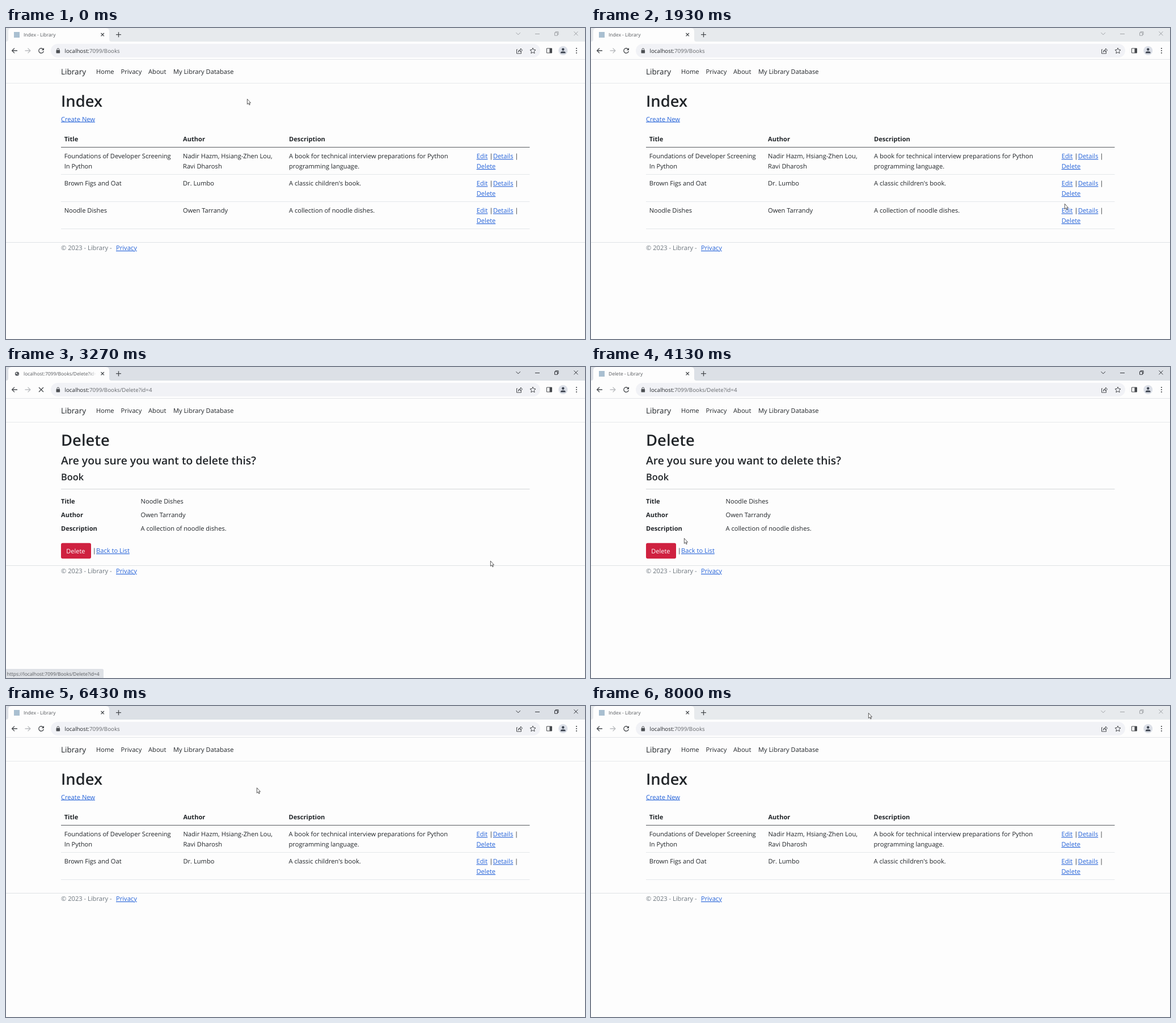
An HTML page for the animation above (8030 ms loop, 1021 by 549 pixels).

```html
<!DOCTYPE html>
<html lang="en">
<head>
<meta charset="utf-8">
<title>Library</title>
<style>
  html, body { margin: 0; width: 100%; height: 100%; overflow: hidden; background: #fdfdfd; }
  svg { display: block; width: 100vw; height: 100vh; }
  text { font-family: "Open Sans", "Noto Sans", sans-serif; font-size: 11.15px; fill: #212529;
         text-rendering: geometricPrecision; white-space: pre; }
  .link { fill: #2563d9; text-decoration: underline; text-decoration-thickness: 1px; }
  .bold { font-weight: 700; font-size: 11.1px; }
  .muted { fill: #6c757d; }
  .head { font-weight: 600; }
  .small { font-size: 8.5px; fill: #55585c; }
  .url { font-size: 9.75px; fill: #25282c; }
  .icon { fill: none; stroke: #46494d; stroke-width: 1.3; }
</style>
</head>
<body>
<svg viewBox="0 0 1021 549">
  <defs>
    <linearGradient id="fade">
      <stop offset="0" stop-color="#fdfdfd" stop-opacity="0"/>
      <stop offset="1" stop-color="#fdfdfd"/>
    </linearGradient>
  </defs>
  <rect width="1021" height="549" fill="#fdfdfd"/>

  <!-- Tab strip -->
  <rect id="strip" width="1021" height="24"/>
  <path d="M0 24Q4 24 4 20V6Q4 0 10 0H176Q182 0 182 6V20Q182 24 186 24Z" fill="#fdfdfd"/>
  <rect id="favicon" x="14" y="7" width="10" height="10" fill="#a9bfd0"/>
  <g id="globe">
    <circle cx="19.5" cy="12" r="3.6" fill="#505459"/>
    <path d="M17 11l2-1 1 1-2 2zM20 13l2-1-1 2z" fill="#fdfdfd"/>
  </g>
  <text id="tabTitle" class="small" x="31" y="14.5"></text>
  <rect x="146" y="4" width="13" height="16" fill="url(#fade)"/>
  <rect x="159" y="4" width="20" height="16" fill="#fdfdfd"/>
  <path class="icon" d="M167.5 9l5.4 5.4M172.9 9l-5.4 5.4M198.5 7.2v9M194 11.7h9"/>
  <g id="controls" fill="none">
    <path d="M899.5 8.2l3.7 3.7 3.7-3.7M933 10.5h8M1001.5 6.3l7 7M1008.5 6.3l-7 7"/>
    <path d="M967.5 8.2h5v5h-5zM969 8V6.7h5v5h-1.3"/>
  </g>

  <!-- Toolbar -->
  <rect x="79" y="28" width="863" height="24" rx="12" fill="#f1f2f6"/>
  <path d="M0 55.5H1021" stroke="#e3e5e8"/>
  <path class="icon" d="M20 40h-9M15 35.6L10.6 40l4.4 4.4"/>
  <path class="icon" style="stroke:#b9bbbe" d="M33.500 40h9M38.500 35.600l4.400 4.400-4.400 4.400"/>
  <g id="reload">
    <path class="icon" d="M65.700 37.700A4.300 4.300 0 1 0 66.300 41"/>
    <path d="M67 35v4.300h-4.300z" fill="#46494d"/>
  </g>
  <path id="stop" class="icon" d="M58 36l8 8M66 36l-8 8"/>
  <rect x="88.500" y="39" width="6.600" height="5.500" rx=".8" fill="#4d5054"/>
  <path class="icon" style="stroke-width:1" d="M90 39.500v-1.700a1.800 1.800 0 0 1 3.600 0v1.700"/>
  <text class="url" x="103.500" y="43.600">localhost:<tspan id="path"></tspan></text>
  <g class="icon" style="stroke-width:1">
    <path d="M902 38h-1.500v7h8v-2.500M903 42.500q.5-4 4.500-4.200V36l3 3.200-3 3.200v-2.200q-3-.2-4.500 2.300z"/>
    <path d="M929 35.200l1.500 3.200 3.500.4-2.600 2.400.7 3.500-3.100-1.800-3.100 1.800.7-3.500-2.600-2.400 3.500-.4z"/>
    <path d="M953.500 36h9v8h-9z"/>
  </g>
  <rect x="958.500" y="36" width="4.500" height="8" fill="#46494d"/>
  <circle cx="982.300" cy="40" r="8" fill="#dbdfe7"/>
  <path d="M978 44.500v-1q0-2.200 4.300-2.200t4.300 2.200v1z" fill="#3d4450"/>
  <circle cx="982.300" cy="37.800" r="2.200" fill="#3d4450"/>
  <g fill="#46494d"><circle cx="1006" cy="36" r="1.100"/><circle cx="1006" cy="40" r="1.100"/><circle cx="1006" cy="44" r="1.100"/></g>

  <g id="nav"></g>
  <g id="fullList"></g>
  <g id="deletePage"></g>
  <g id="shortList"></g>

  <g id="status">
    <path d="M0 533H169.500Q172 533 172 535.500V549H0Z" fill="#dee1e6"/>
    <text class="small" x="1.500" y="544.600">https://localhost:7099/Books/Delete?id=4</text>
  </g>

  <g id="cursor" stroke-linejoin="round">
    <path id="arrow" d="M.4.4V9.600L2.500 7.700 3.900 10.900 5.300 10.300 3.900 7.200H6.500Z" fill="#fff" stroke="#333" stroke-width=".8"/>
    <path id="hand" d="M-1 .9Q0-.6 1 .9V4.500L4.600 5.200Q5.600 5.500 5.500 6.500L4.700 10.500V12.300H-.8V11L-3.500 7.300Q-3.800 6-2.500 6.100L-1 7.300Z" fill="#fff" stroke="#222" stroke-width=".8"/>
  </g>
</svg>
<script>
const LOOP = 8030;
const $ = id => document.getElementById(id);

const text = (x, y, str, cls = "", size) =>
  `<text x="${x}" y="${y}" class="${cls}"${size ? ` style="font-size:${size}px"` : ""}>${str}</text>`;
const line = (y, color, x1 = 97, x2 = 923.5) =>
  `<path d="M${x1} ${y}H${x2}" stroke="${color}"/>`;
const footer = y => line(y, "#dfe2e5", 0, 1021) +
  text(97, y + 13.5, "© 2023 - Library - ", "muted") + text(194, y + 13.5, "Privacy", "link");

const books = [
  [["Foundations of Developer Screening", "In Python"],
   ["Nadir Hazm, Hsiang-Zhen Lou,", "Ravi Dharosh"],
   ["A book for technical interview preparations for Python", "programming language."]],
  [["Brown Figs and Oat"], ["Dr. Lumbo"], ["A classic children's book."]],
  [["Noodle Dishes"], ["Owen Tarrandy"], ["A collection of noodle dishes."]]
];

function listPage(rows, columns) {
  const [title, author, description, actions] = columns;
  let out = text(97, 139.3, "Index", "head", 27.4) + text(97, 164.5, "Create New", "link");
  ["Title", "Author", "Description"].forEach((name, i) => out += text(columns[i], 200.3, name, "bold"));
  out += line(210.5, "#55595e");
  rows.forEach((cells, i) => {
    const y = 230.3 + i * 48;
    cells.forEach((lines, c) => lines.forEach((str, n) => out += text(columns[c], y + n * 17.7, str)));
    out += text(actions, y, "Edit", "link") + text(actions + 22.7, y, "|") +
      text(actions + 29.3, y, "Details", "link") + text(actions + 67.5, y, "|") +
      text(actions, y + 17.7, "Delete", "link") + line(258.5 + i * 48, "#e4e7ea");
  });
  return out + footer(234.5 + rows.length * 48);
}

function deletePage([title, author, description]) {
  const details = [["Title", title], ["Author", author], ["Description", description]];
  return text(97, 139.3, "Delete", "head", 27.4) +
    text(97, 171.7, "Are you sure you want to delete this?", "head", 19.3) +
    text(97, 200.3, "Book", "head", 16.3) + line(215.5, "#d3d5d8") +
    details.map(([name, value], i) =>
      text(97, 241.3 + i * 23.6, name, "bold") + text(237.5, 241.3 + i * 23.6, value)).join("") +
    `<rect id="ring" x="94.500" y="308.500" width="58" height="32.500" rx="5" fill="#eca5b1"/>
     <rect id="button" x="97" y="310.700" width="53" height="27.600" rx="3"/>` +
    text(106.3, 328.6, "Delete", "\" fill-opacity=\"1", 11).replace("font-size", "fill:#fff;font-size") +
    text(152.7, 328.2, "|") + text(159, 328.2, "Back to List", "link") + footer(350.5);
}

$("nav").innerHTML = text(97, 82.2, "Library", "", 13.6) +
  [[159, "Home"], [202.5, "Privacy"], [251, "About"], [295, "My Library Database"]]
    .map(([x, str]) => text(x, 81.2, str)).join("") + line(97.5, "#e6e8ea", 0, 1021);
$("fullList").innerHTML = listPage(books, [102.7, 312, 499, 829.7]);
$("deletePage").innerHTML = deletePage(books[2]);
$("shortList").innerHTML = listPage(books.slice(0, 2), [102.7, 312.4, 498.5, 829.5]);

// Cursor stops: time, x, y
const stops = [
  [0, 425, 125], [730, 425, 125], [1800, 834, 307], [1930, 835, 310], [2250, 837, 315],
  [2550, 853, 340], [3000, 853, 340], [3270, 854, 342], [3400, 854, 342], [4130, 164, 302],
  [4550, 130, 321], [5660, 130, 321], [6430, 442, 144], [6750, 443, 143],
  [7650, 489, 12], [LOOP, 489, 12]
];

function cursorAt(t) {
  const i = stops.findIndex(stop => stop[0] > t);
  const [t0, x0, y0] = stops[i - 1], [t1, x1, y1] = stops[i];
  const p = (t - t0) / (t1 - t0), k = p * p * (3 - 2 * p);
  return [x0 + (x1 - x0) * k, y0 + (y1 - y0) * k];
}

const show = (id, on) => $(id).style.display = on ? "" : "none";

function draw(now) {
  const t = now % LOOP;
  const within = (from, to) => t >= from && t < to;
  const deleting = within(3130, 5640);
  const loadingTitle = within(3130, 3500) || within(5640, 5800);
  const loading = within(2950, 3500) || within(5330, 5800);
  const active = within(2880, 7820);
  const path = "7099/Books" + (deleting ? "/Delete?id=4" : "");

  show("fullList", t < 3130);
  show("deletePage", deleting);
  show("shortList", t >= 5640);
  show("status", within(2450, 3420));
  show("favicon", !loadingTitle);
  show("globe", loadingTitle);
  show("reload", !loading);
  show("stop", loading);

  $("strip").setAttribute("fill", active ? "#dce0e6" : "#e7eaed");
  $("controls").setAttribute("stroke", active ? "#303338" : "#a0a3a7");
  $("tabTitle").textContent = loadingTitle ? "localhost:" + path : (deleting ? "Delete" : "Index") + " - Library";
  $("path").textContent = path;
  $("path").style.fill = "#65686c";

  const pressed = within(5250, 5640), hovered = within(4400, 5640);
  show("ring", pressed);
  $("button").setAttribute("fill", pressed ? "#a21a36" : hovered ? "#b81e39" : "#cf2140");

  const [x, y] = cursorAt(t);
  const pointing = within(2430, 3130) || hovered;
  show("arrow", !pointing);
  show("hand", pointing);
  $("cursor").setAttribute("transform", `translate(${x.toFixed(1)} ${y.toFixed(1)})`);
}

const start = performance.now();
function tick() {
  draw(performance.now() - start);
  requestAnimationFrame(tick);
}
tick();
</script>
</body>
</html>
```
